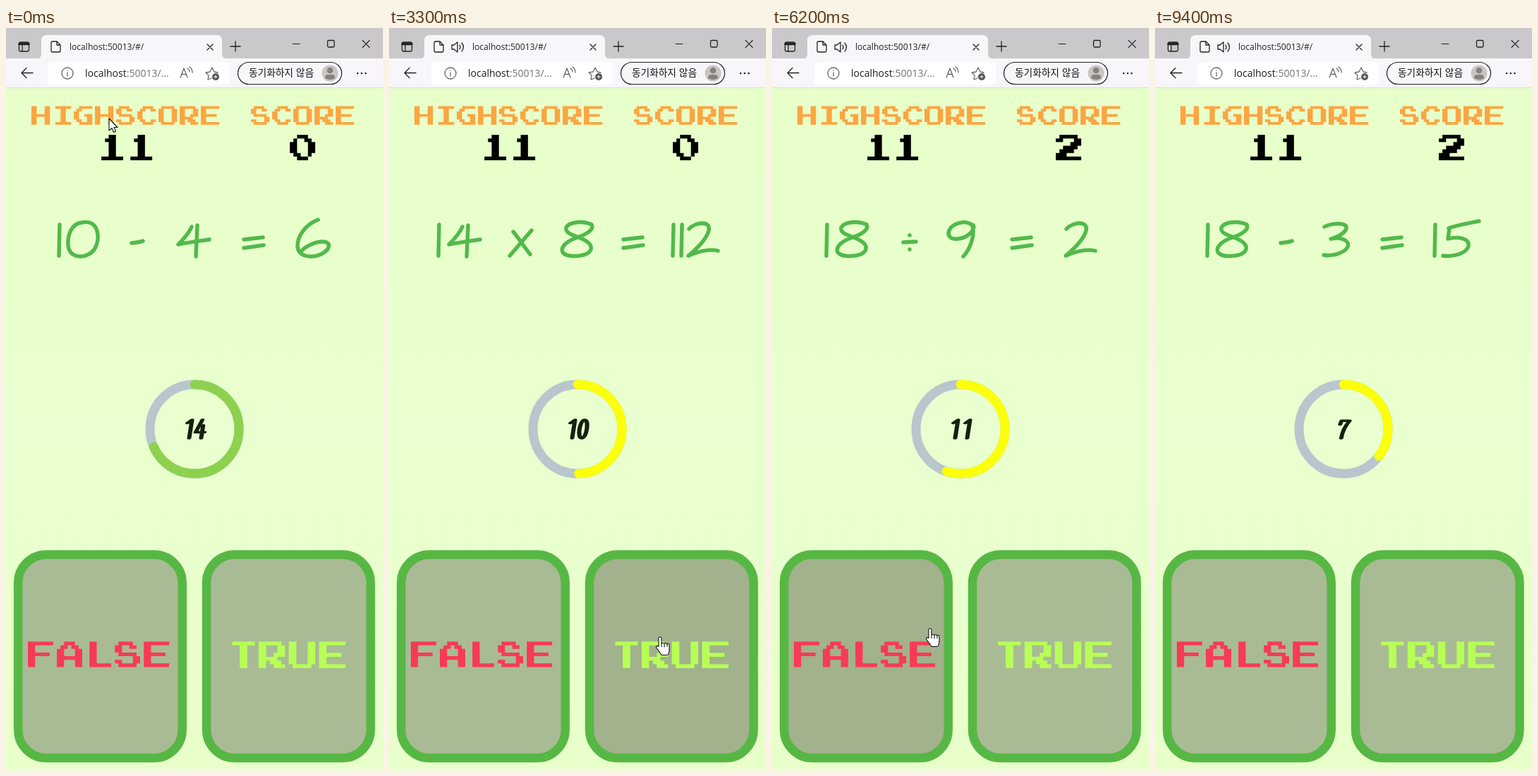
An HTML page that plays this animation: 534x1049 px, repeating every 9.5 s.

```html
<!DOCTYPE html>
<html lang="ko">
<head>
<meta charset="utf-8">
<title>True or false</title>
<style>
html, body { margin: 0; width: 100%; height: 100%; overflow: hidden; background: #e8ffcb; }
svg { display: block; width: 100%; height: 100%; }
text { font-family: "Open Sans", "Noto Sans", sans-serif; }
.line { fill: none; stroke: #222; stroke-width: 1.3; stroke-linecap: round; stroke-linejoin: round; }
.ink { fill: none; stroke: #52b94b; stroke-width: 5.4; stroke-linecap: round; stroke-linejoin: round; }
.num { fill: none; stroke: #14200f; stroke-width: 5.2; stroke-linejoin: round; stroke-linecap: round; }
.ring { fill: none; stroke-width: 13; stroke-linecap: round; }
</style>
</head>
<body>
<svg viewBox="0 0 534 1049">
  <defs>
    <linearGradient id="page" x2="0" y2="1">
      <stop stop-color="#e7ffc9"/><stop offset=".5" stop-color="#e9ffcf"/><stop offset="1" stop-color="#e8ffca"/>
    </linearGradient>
  </defs>
  <rect y="84" width="534" height="965" fill="url(#page)"/>

  <!-- browser frame -->
  <rect width="534" height="44" fill="#cbc8cb"/>
  <rect y="43" width="534" height="41" fill="#f8f6fa"/>
  <rect y="84" width="534" height="1" fill="#dcdedb"/>
  <path d="M42 44q8 0 8-8V18q0-8 8-8h240q8 0 8 8v18q0 8 8 8z" fill="#f8f6fa"/>
  <g class="line">
    <rect x="18.500" y="20" width="14" height="13" rx="2.500"/>
    <path d="M19 22.500h13" stroke-width="3.500"/><path d="M23 24v9"/>
    <path d="M66 19h6l5 5v8q0 2-2 2h-9q-2 0-2-2v-11q0-2 2-2zM72 19v5h5"/>
    <path d="M285 23l8 8M293 23l-8 8M318 26h14M325 19v14"/>
    <path d="M406 22.500h10M505 17.500l10 10M515 17.500l-10 10" stroke-width="1.100"/>
    <rect x="455.500" y="17.500" width="9.500" height="9.500" rx="1.500"/>
    <path d="M38 63.500H22M29 56.500l-7 7 7 7"/>
  </g>
  <rect x="60" y="48" width="257" height="32" rx="5" fill="#fff"/>
  <g class="line" style="stroke:#666">
    <circle cx="87" cy="64" r="8"/><path d="M87 63v5M87 60v.1"/>
    <path d="M247 70l5-13 5 13M249 65.500h6M257 57q3 2 3 5M260 55q4 3 4 8"/>
    <path d="M291 71l-5 2 1-6-4-4 6-1 3-6 3 6 5 1"/>
  </g>
  <circle cx="297" cy="69" r="5" fill="#555"/>
  <path d="M294.500 69h5M297 66.500v5" stroke="#fff"/>
  <text x="112" y="69" font-size="14" fill="#1b1b1b">localhost<tspan fill="#737373">:50013/...</tspan></text>
  <rect x="328.500" y="48.500" width="147" height="31" rx="15.500" fill="#f8f6fa" stroke="#222" stroke-width="1.200"/>
  <text x="344" y="68" font-size="13.700" fill="#111" style="font-family:'Noto Sans CJK KR','Noto Sans CJK',sans-serif">동기화하지 않음</text>
  <circle cx="459" cy="64" r="11.500" fill="#c8c5c2"/>
  <path d="M452 71q0-5 4-5h6q4 0 4 5-7 4-14 0z" fill="#85817e"/>
  <circle cx="459" cy="60" r="4.300" fill="#85817e"/>
  <path d="M498 64h.1M503.700 64h.1M509.400 64h.1" class="line" style="stroke-width:2.400"/>
  <path id="speaker" class="line" d="M89 24h3l5-4v14l-5-4h-3zM100 24q2 3 0 6M103 21q5 6 0 12"/>
  <text id="tab" y="31" font-size="12.100" fill="#222">localhost:50013/#/</text>

  <!-- game -->
  <g id="labels"></g>
  <g id="score"></g>
  <g id="sum" class="ink"></g>
  <circle class="ring" cx="267" cy="567" r="63" stroke="#b8c6cd"/>
  <circle id="arc" class="ring" cx="267" cy="567" r="63" transform="rotate(-90 267 567)"/>
  <g id="count" class="num"></g>
  <g stroke="#57b744" stroke-width="12.500">
    <rect id="no" x="17.200" y="744.500" width="232.500" height="287.500" rx="40"/>
    <rect id="yes" x="284" y="744.500" width="232.500" height="287.500" rx="40"/>
  </g>
  <g id="words"></g>
  <path id="pointer" fill="#fff" stroke="#111" stroke-width="1.100" stroke-linejoin="round"/>
</svg>
<script>
const $ = id => document.getElementById(id);

// Arcade letters on a 7 by 7 grid
const block = {
  H: 'M0 0h2v3h3v-3h2v7h-2v-3h-3v3h-2z',
  I: 'M1 0h6v1h-2v5h2v1h-6v-1h2v-5h-2z',
  T: 'M1 0h6v1h-2v6h-2v-6h-2z',
  L: 'M1 0h2v6h4v1h-6z',
  E: 'M0 0h7v1h-5v2h4v1h-4v2h5v1h-7z',
  F: 'M0 0h7v1h-5v2h4v1h-4v3h-2z',
  U: 'M0 0h2v6h3v-6h2v6h-1v1h-5v-1h-1z',
  O: 'M1 0h5v1h1v5h-1v1h-5v-1h-1v-5h1zM2 1v5h3v-5z',
  C: 'M2 0h4v1h1v1h-2v-1h-2v1h-1v3h1v1h2v-1h2v1h-1v1h-4v-1h-1v-1h-1v-3h1v-1h1z',
  G: 'M2 0h5v1h-4v1h-1v3h1v1h2v-2h-1v-1h3v4h-5v-1h-1v-1h-1v-3h1v-1h1z',
  S: 'M1 0h4v1h1v1h-2v-1h-2v2h4v1h1v2h-1v1h-5v-1h-1v-1h2v1h3v-2h-4v-1h-1v-2h1z',
  R: 'M0 0h6v1h1v3h-2v1h1v1h1v1h-3v-1h-1v-1h-1v2h-2zM2 1v3h2v-1h1v-2z',
  A: 'M2 0h3v1h1v1h1v5h-2v-2h-3v2h-2v-5h1v-1h1zM3 1v1h-1v2h3v-2h-1v-1z',
  0: 'M2 0h3v1h1v1h1v3h-1v1h-1v1h-3v-1h-1v-1h-1v-3h1v-1h1zM2 1v4h1v1h2v-4h-1v-1z',
  1: 'M3 0h2v6h2v1h-6v-1h2v-4h-1v-1h1z',
  2: 'M1 0h5v1h1v2h-1v1h-1v1h-2v1h4v1h-7v-2h1v-1h1v-1h2v-1h1v-1h-3v1h-2v-1h1z'
};

// Handwritten strokes, left edge at 0
const hand = {
  0: 'M23 5C8 6 2 22 3 37C4 53 20 56 32 50C44 44 47 28 44 17C41 6 32 3 23 5',
  1: 'M3 8L2 52',
  2: 'M5 14C14 4 36 2 33 16C30 28 16 42 4 52C18 46 34 42 46 45',
  3: 'M5 11C14 6 38 4 36 13C35 20 22 26 14 28C30 25 41 31 38 39C34 48 16 53 4 51',
  4: 'M22 11C18 20 10 29 3 36C18 33 34 31 47 29M30 9L28 53',
  5: 'M13 13L11 28C26 24 42 28 40 38C38 48 20 54 4 52M12 13C26 8 40 6 55 3',
  6: 'M32 1C14 8 2 25 3 39C4 53 22 56 36 50C48 44 50 36 44 33C34 29 14 38 8 46',
  8: 'M46 8C34 2 14 4 10 12C8 20 20 23 30 27C42 32 48 38 44 45C38 54 10 55 5 47C1 38 14 30 26 26C38 22 50 15 46 8',
  9: 'M36 8C24 0 4 8 3 20C3 32 24 30 34 20C40 14 40 8 36 8C42 20 34 42 24 53',
  '-': 'M3 34C9 33 15 33 19 31',
  '+': 'M3 31L37 28M20 15L19 48',
  'x': 'M34 16L3 52M8 18C16 28 24 40 32 50',
  '÷': 'M3 33L21 32M12 23v.1M12 43v.1',
  '=': 'M3 29L30 26M3 41L31 37'
};

// Slanted countdown digits in a 10 by 40 box
const slant = {
  0: 'M5 0C11 0 11 40 5 40C-1 40 -1 0 5 0',
  1: 'M3 7L8 0V40',
  2: 'M0 9C0 -3 11 -3 10 9C9 20 2 28 0 39C4 35 6 42 11 37',
  3: 'M0 7C2 -2 11 -2 10 8C9 15 6 18 3 18C12 18 12 40 4 40C0 40 -1 36 -1 32',
  4: 'M6 0L0 27H11M8 12V40',
  7: 'M0 10L1 2H11C6 14 4 26 4 40',
  8: 'M5 19C-2 14 0 0 6 0C12 0 11 14 5 19C-2 25 -1 40 5 40C11 40 12 25 5 19',
  9: 'M10 12C10 22 0 24 0 12C0 -4 10 -4 10 10C10 26 8 38 1 40'
};

const arrow = 'M0 0V17L4 13.500L6.500 19.500L9.500 18L7 12.500H12z';
const finger = 'M-2 1a2 2 0 0 1 4 0v8c0-2 4-2 4 0c0-2 4-1.500 4 .5c0-1.500 3-1.500 3 1v6c0 5-2 8-3 8h-8c-2-4-5-7-7-10c-1.500-2 1-4 3-2zM2 9v4M6 9.500v4M10 10v3';

const stages = [
  { at: 0, base: 13.67, score: 0, sum: '10-4=6', x: [73, 85, 175, 241, 334, 410] },
  { at: 2.4, base: 13.2, score: 0, sum: '14x8=112', x: [68, 82, 168, 241, 329, 400, 412, 420] },
  { at: 4.3, base: 15.2, score: 1, sum: '16+1=20', x: [70, 81, 167, 245, 293, 364, 414] },
  { at: 5.3, base: 17.2, score: 2, sum: '18÷9=2', x: [75, 88, 183, 247, 337, 412] },
  { at: 7.5, base: 16.47, score: 2, sum: '18-3=15', x: [72, 84, 175, 235, 319, 394, 404] }
];

// Pointer stops: seconds, x, y
const stops = [
  [0, 146, 128], [.15, 146, 128], [.8, 370, 18], [1.1, 370, 18], [1.9, 177, 882], [2.6, 177, 882],
  [3.3, 384, 862], [4.4, 384, 862], [4.9, 206, 850], [5.4, 206, 850], [6.4, 226, 850],
  [8.1, 226, 850], [8.7, 240, 1080], [9.5, 240, 1080]
];

const blocks = (word, x, y, unit, fill) =>
  `<g role="img" aria-label="${word}" transform="translate(${x} ${y}) scale(${unit})" fill="${fill}" fill-rule="evenodd">` +
  [...word].map((c, i) => `<path transform="translate(${i * 8})" d="${block[c]}"/>`).join('') + '</g>';

const drawSum = s => [...s.sum].map((c, i) =>
  `<path transform="translate(${s.x[i]} 270)" d="${hand[c]}"/>`).join('');

const drawCount = n => [...String(n)].map((c, i, all) => {
  const x = all.length > 1 ? 258 + i * 17 : 267;
  return `<path transform="translate(${x} 567) skewX(-9) scale(1.15 .65) translate(-5 -20)" d="${slant[c]}"/>`;
}).join('');

function pointerAt(t) {
  const i = Math.max(1, stops.findIndex(s => s[0] > t));
  const [t0, x0, y0] = stops[i - 1], [t1, x1, y1] = stops[i];
  const k = (t - t0) / (t1 - t0), e = k * k * (3 - 2 * k);
  return [x0 + (x1 - x0) * e, y0 + (y1 - y0) * e];
}

const put = (id, key, html) => {
  const el = $(id);
  if (el.dataset.key !== String(key)) {
    el.dataset.key = key;
    el.innerHTML = html();
  }
};

$('labels').innerHTML = blocks('HIGHSCORE', 36, 110.5, 3.75, '#fca541') +
  blocks('SCORE', 347, 110.5, 3.75, '#fca541') + blocks('11', 130, 151, 5.14, '#000');
$('words').innerHTML = blocks('FALSE', 31, 867.5, 5.13, '#f73b55') + blocks('TRUE', 315, 867.5, 5.35, '#b7ff55');

const turn = 2 * Math.PI * 63;

function draw(t) {
  const stage = stages.filter(s => s.at <= t).pop();
  const left = stage.base - t, count = Math.ceil(left - .12);
  put('sum', stage.sum, () => drawSum(stage));
  put('score', stage.score, () => blocks(String(stage.score), 402, 151, 5.14, '#000'));
  put('count', count, () => drawCount(count));
  $('arc').setAttribute('stroke-dasharray', `${left / 20 * turn} ${turn}`);
  $('arc').setAttribute('stroke', left > 12 ? '#8ed14f' : '#fcff0c');

  const sound = t >= stages[1].at;
  $('speaker').setAttribute('visibility', sound ? 'visible' : 'hidden');
  $('tab').setAttribute('x', sound ? 118 : 90);

  const [x, y] = pointerAt(t);
  const inRow = y > 738 && y < 1038;
  const onNo = inRow && x > 11 && x < 256, onYes = inRow && x > 278 && x < 523;
  $('no').setAttribute('fill', onNo ? '#a1b28c' : '#a9bb95');
  $('yes').setAttribute('fill', onYes ? '#a1b28c' : '#a9bb95');
  $('pointer').setAttribute('d', onNo || onYes ? finger : arrow);
  $('pointer').setAttribute('transform', `translate(${x} ${y})`);
}

function tick() {
  draw(Math.floor(performance.now() % 9500 / 100) / 10);
  requestAnimationFrame(tick);
}
tick();
</script>
</body>
</html>
```
